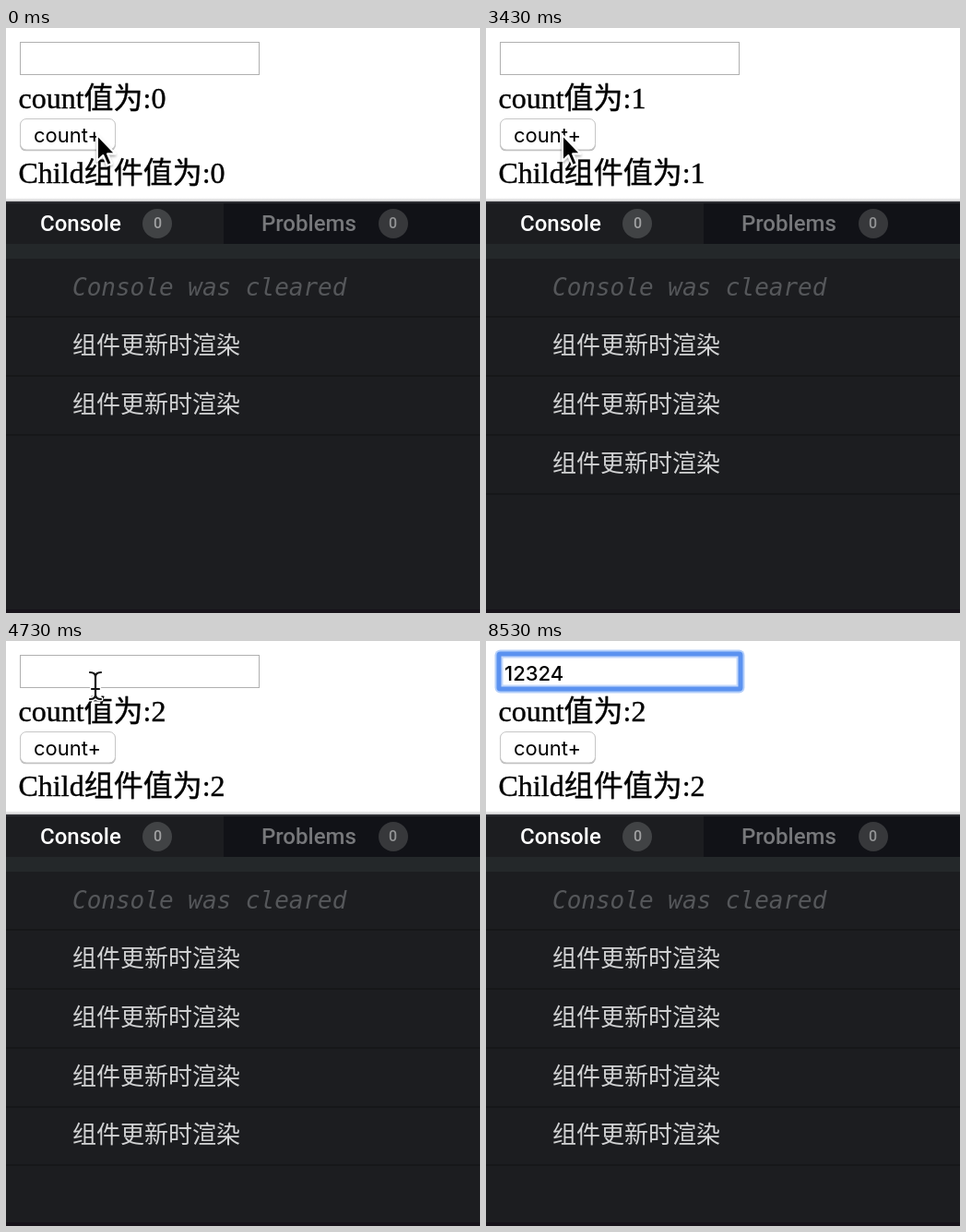
These frames come from a looping animation (514 px wide and 634 px high, 8810 ms). An HTML page:

```html
<!DOCTYPE html>
<html lang="zh">
<head>
<meta charset="utf-8">
<style>
  html, body { margin: 0; width: 100%; height: 100%; overflow: hidden; background: #fff; }
  svg { display: block; width: 100vw; height: 100vh; }
  text { white-space: pre; }
  .page { font: 32px "Liberation Serif", "Noto Sans CJK SC", "Noto Sans CJK", serif; stroke: #000; stroke-width: .4; }
  .control { font: 22px Inter, sans-serif; }
  .typed { font-weight: 500; }
  .tab { font: 500 24px Roboto, sans-serif; }
  .badge { font: 500 16px Roboto, sans-serif; text-anchor: middle; }
  .note { font: italic 26px "DejaVu Sans Mono", monospace; fill: #55575a; }
  .log { font: 26px "Noto Sans CJK SC", "Noto Sans CJK", sans-serif; fill: #d2d3d4; }
</style>
</head>
<body>
<svg viewBox="0 0 514 634">
  <defs>
    <linearGradient id="pressed" x2="0" y2="1">
      <stop stop-color="#438ffb"/><stop offset="1" stop-color="#0a4fe0"/>
    </linearGradient>
    <linearGradient id="edge" x2="0" y2="1">
      <stop stop-color="#fff"/><stop offset="1" stop-color="#c8c8ca"/>
    </linearGradient>
    <filter id="shadow" x="-50%" y="-50%" width="200%" height="200%">
      <feDropShadow dx="0" dy="2" stdDeviation="1.5" flood-opacity=".35"/>
    </filter>
  </defs>

  <rect width="514" height="634" fill="#fff"/>
  <rect x="15.5" y="15.5" width="259" height="35" fill="#fff" stroke="#b0b0b0"/>
  <g id="focus">
    <rect x="9.5" y="9.5" width="271" height="47" rx="6" fill="#b4cffa"/>
    <rect x="11.5" y="11.5" width="267" height="43" rx="4" fill="#5b92f0"/>
    <rect x="16.5" y="16.5" width="257" height="33" fill="#c3d8fb"/>
    <rect x="18.5" y="18.5" width="253" height="29" fill="#fff"/>
  </g>
  <text id="typed" class="control typed" x="20" y="42.5"></text>
  <rect id="caret" y="20" width="2" height="26"/>

  <text id="count" class="page" x="13.5" y="86.5"></text>
  <rect x="15" y="99" width="104" height="34.3" rx="6.5" fill="#bdbdbd"/>
  <rect id="button" x="15.5" y="98.5" width="103" height="33.5" rx="6.5"/>
  <text class="control" x="30" y="124">count+</text>
  <text id="child" class="page" x="13.5" y="168"></text>

  <rect y="184" width="514" height="4" fill="url(#edge)"/>
  <rect y="188" width="514" height="446" fill="#1c1d20"/>
  <rect y="188" width="514" height="2" fill="#2b2c31"/>
  <rect x="236" y="190" width="278" height="44" fill="#111217"/>
  <rect y="234" width="514" height="16" fill="#24282a"/>
  <rect y="630" width="514" height="4" fill="#17131a"/>
  <text class="tab" x="37" y="220" fill="#fff">Console</text>
  <circle cx="164" cy="212" r="16" fill="#414345"/>
  <text class="badge" x="164.5" y="217" fill="#a0a1a2">0</text>
  <text class="tab" x="277" y="220" fill="#77787b">Problems</text>
  <circle cx="420" cy="212" r="16" fill="#37383b"/>
  <text class="badge" x="419.5" y="217" fill="#929395">0</text>
  <text class="note" x="72" y="290">Console was cleared</text>
  <rect y="312" width="514" height="2" fill="#161719"/>
  <g id="logs"></g>

  <path id="arrow" filter="url(#shadow)" stroke="#fff" stroke-width="2" stroke-linejoin="round"
    d="M0 0V28L6.3 22L11 33L15.7 31L11 20.3H19.5Z"/>
  <g id="beam" fill="none" stroke-linecap="round">
    <path id="beamHalo" stroke="#fff" stroke-width="5"/>
    <path id="beamLine" stroke="#111" stroke-width="2.2"/>
  </g>
</svg>
<script>
const LOOP = 8810;
const CLICKS = [2130, 3570];
const RELEASE_DELAY = 130;
const LOG_DELAY = 200;
const ROW_HEIGHT = 63.8;
const KEYS = [[5900, '1'], [6030, '2'], [6400, '3'], [6870, '2'], [7030, '4']];
const FOCUS_AT = 5030;

// Each point is [time, value]; values are interpolated linearly.
const pointerX = [[1650, 99], [1830, 83], [4180, 83], [4370, 91], [4730, 97]];
const pointerY = [[4180, 116], [4370, 75], [4730, 48], [8030, 48], [8100, -20]];
const caretOpacity = [
  [5029, 0], [5030, 1], [5420, 1], [5530, 0], [5899, 0], [5900, 1],
  [7420, 1], [7530, 0], [8020, 0], [8100, 1], [8420, 1], [8530, 0]
];

const el = id => document.getElementById(id);
const show = (node, visible) => node.setAttribute('visibility', visible ? 'visible' : 'hidden');

function sample(points, t) {
  const next = points.findIndex(p => p[0] > t);
  if (next === 0) return points[0][1];
  if (next < 0) return points[points.length - 1][1];
  const [t0, v0] = points[next - 1], [t1, v1] = points[next];
  return v0 + (v1 - v0) * (t - t0) / (t1 - t0);
}

function setText(id, value) {
  if (el(id).textContent !== value) el(id).textContent = value;
}

for (const id of ['beamHalo', 'beamLine']) {
  el(id).setAttribute('d', 'M-6 -14Q0 -14 0 -9Q0 -14 6 -14M0 -9V10M-6 15Q0 15 0 10Q0 15 6 15M-4 4H4');
}

const rowY = (base, i) => Math.round(base + ROW_HEIGHT * i);
el('logs').innerHTML = [0, 1, 2, 3].map(i => `<g>
  <text class="log" x="72" y="${rowY(353, i)}">组件更新时渲染</text>
  <rect y="${rowY(376, i)}" width="514" height="2" fill="#161719"/></g>`).join('');
const logs = [...el('logs').children];

function render(t) {
  const clicksAfter = delay => CLICKS.filter(c => t >= c + delay).length;
  const released = clicksAfter(RELEASE_DELAY);
  const pressed = clicksAfter(0) > released;
  setText('count', 'count值为:' + released);
  setText('child', 'Child组件值为:' + released);
  el('button').setAttribute('fill', pressed ? 'url(#pressed)' : '#fff');
  el('button').setAttribute('stroke', pressed ? '#1d61e6' : '#c6c6c6');
  logs.forEach((row, i) => show(row, i < 2 + clicksAfter(LOG_DELAY)));

  show(el('focus'), t >= FOCUS_AT);
  setText('typed', KEYS.filter(k => t >= k[0]).map(k => k[1]).join(''));
  el('caret').setAttribute('x', 20 + Math.round(el('typed').getComputedTextLength()));
  el('caret').setAttribute('opacity', sample(caretOpacity, t));

  const x = sample(pointerX, t), y = sample(pointerY, t);
  const overText = y < 96;
  const hiddenByTyping = t >= KEYS[0][0] && t < 8030;
  for (const id of ['arrow', 'beam']) el(id).setAttribute('transform', `translate(${x} ${y})`);
  show(el('arrow'), !overText);
  show(el('beam'), overText && !hiddenByTyping);
}

const start = performance.now();
function tick() {
  render((performance.now() - start) % LOOP);
  requestAnimationFrame(tick);
}
tick();
</script>
</body>
</html>
```
